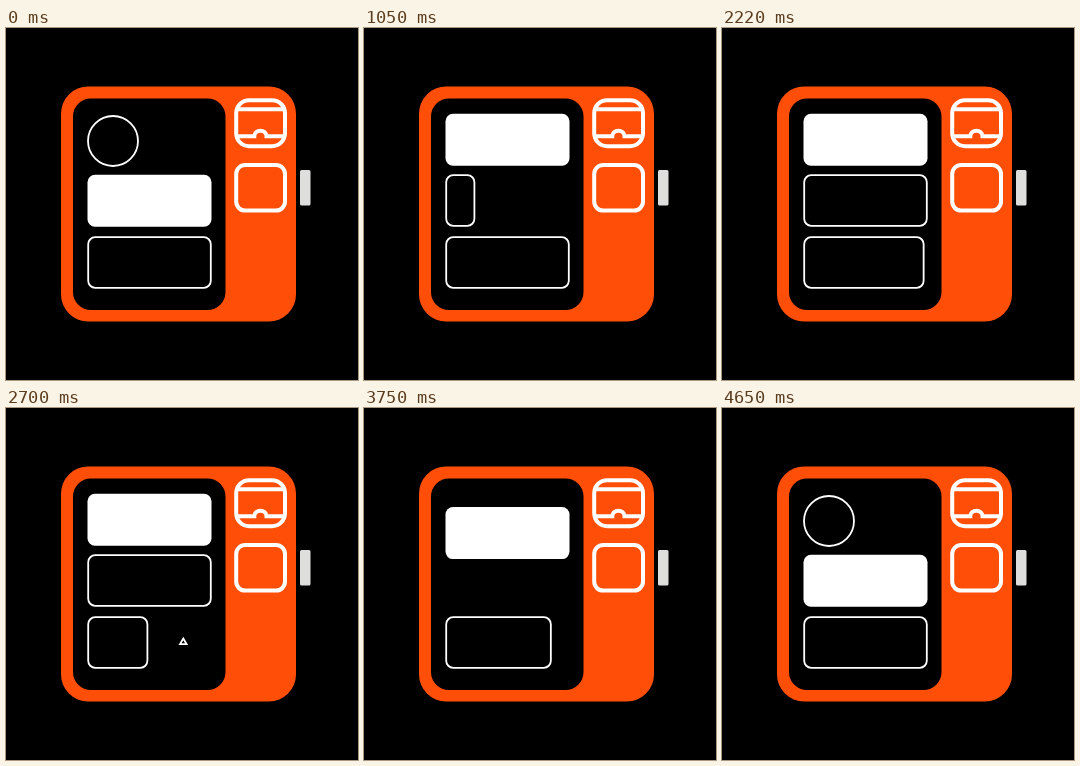
An HTML page for the animation above (4710 ms loop, 352 px wide and 352 px high).

```html
<!DOCTYPE html>
<html lang="en">
<head>
<meta charset="utf-8">
<title>Widget layout</title>
<style>
  html, body { margin: 0; width: 100%; height: 100%; overflow: hidden; background: #000; }
  svg { display: block; width: 100%; height: 100%; }
  .line { fill: none; stroke: #fff; stroke-width: 1.8; }
  .icon { fill: none; stroke: #fff; stroke-width: 4; }
</style>
</head>
<body>
<svg viewBox="0 0 352 352">
  <rect x="55" y="58.5" width="235" height="235" rx="27" fill="#ff4e08"/>
  <rect x="67" y="70.5" width="152.5" height="211.5" rx="18"/>
  <rect x="294" y="142" width="10.5" height="35.5" rx="1.5" fill="#dededc"/>
  <g class="icon">
    <rect x="230.2" y="72.2" width="48.8" height="46" rx="13"/>
    <path d="M231 81.3H278M231 108.3H248.3a6 5.5 0 0 1 12.2 0H278"/>
    <rect x="230.2" y="137" width="48.8" height="45.6" rx="9"/>
  </g>
  <circle id="ring" class="line" cx="107" cy="113" r="25"/>
  <rect id="middle" class="line" x="82.2" y="147.2" height="50.6" rx="7"/>
  <rect id="bottom" class="line" x="82.2" y="209.2" height="50.6" rx="7"/>
  <path id="triangle" class="line" d="M0-24.3L28.8 24.7H-28.8Z" vector-effect="non-scaling-stroke"/>
  <rect id="card" x="81.5" width="124" height="52" rx="7.5" fill="#fff"/>
</svg>
<script>
const LOOP = 4710, FULL = 122.6, HALF = 59.2;
const [ring, middle, bottom, triangle, card] =
  ["ring", "middle", "bottom", "triangle", "card"].map(id => document.getElementById(id));

const span = (t, from, to) => Math.min(1, Math.max(0, (t - from) / (to - from)));
const easeIn = p => p ** 1.72;
const backOut = (p, s) => 1 + (s + 1) * (p - 1) ** 3 + s * (p - 1) ** 2;
const mix = (a, b, p) => a + (b - a) * p;
const show = (el, size) => el.setAttribute("visibility", size > 0.01 ? "visible" : "hidden");

// Shrinks away quickly after `end`, pops in with overshoot after `start`.
const pop = (t, start, length, s) => backOut(span(t, start, start + length), s);
const leave = (t, end) => 1 - easeIn(span(t, end, end + 150));

function draw(now) {
  const t = now % LOOP;

  const ringSize = t < 2000 ? leave(t, 490) : pop(t, 4090, 550, 2.6);
  ring.setAttribute("r", Math.max(0, 25 * ringSize));
  show(ring, ringSize);

  const up = easeIn(span(t, 480, 1020)) - easeIn(span(t, 3540, 4050));
  card.setAttribute("y", mix(146.8, 85.7, up));

  const midSize = t < 3000 ? pop(t, 1025, 505, 1.8) : leave(t, 3545);
  middle.setAttribute("width", Math.max(0, FULL * midSize));
  show(middle, midSize);

  const narrow = easeIn(span(t, 2130, 2650)) - easeIn(span(t, 3545, 3795));
  bottom.setAttribute("width", mix(FULL, HALF, narrow));

  const triSize = t < 3400 ? pop(t, 2690, 530, 2.6) : leave(t, 3545);
  triangle.setAttribute("transform", `translate(177.3 233.3) scale(${Math.max(0, triSize)})`);
  show(triangle, triSize);
}

const begin = performance.now();
function tick() {
  draw(performance.now() - begin);
  requestAnimationFrame(tick);
}
tick();
</script>
</body>
</html>
```
